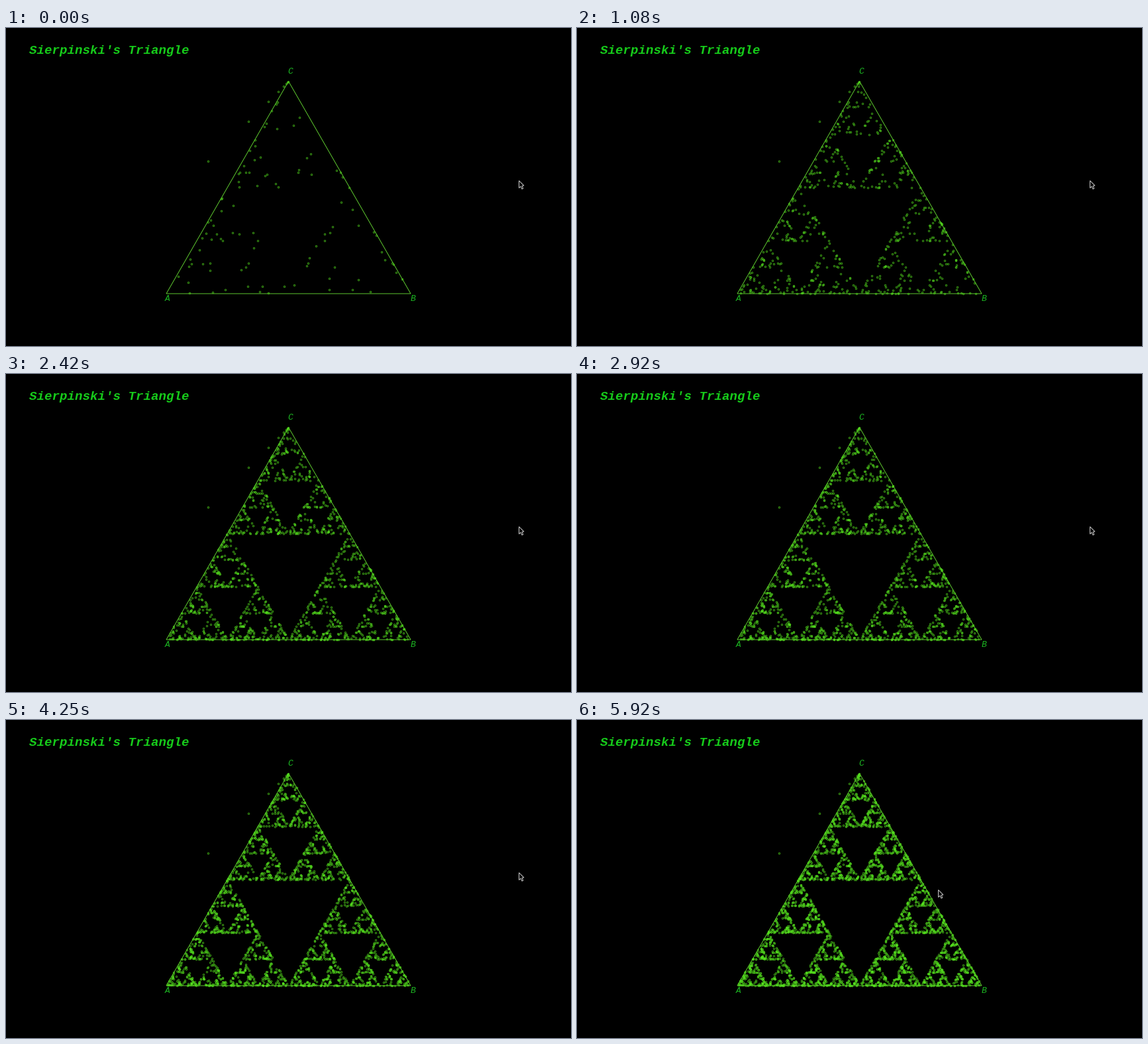
A matplotlib script for the animation above (6010 ms loop, 853 px wide and 480 px high).

```python
import random

import matplotlib.pyplot as plt
import numpy as np
from matplotlib.animation import FuncAnimation
from matplotlib.patches import Polygon

W, H, DPI = 853, 480, 80
FRAMES, LOOP_MS = 72, 6010
PT = 72 / DPI  # points per pixel

CORNERS = {"A": (242, 401), "B": (611, 401), "C": (426.5, 80.5)}
START = (305.5, 200.5)
APPROACH = 7  # first jumps, all toward C
FIRST_DOTS, DOTS_PER_FRAME = 106, 45

POINTER = np.array([(0, 0), (0, 11), (2.6, 8.6), (4.4, 12.6),
                    (6.2, 11.8), (4.5, 7.8), (7.4, 7.4)])


def chaos_game(count):
    """Repeatedly jump halfway to a random corner."""
    rng = random.Random(7)
    dots = np.empty((count, 2))
    dots[0] = START
    for i in range(1, count):
        pick = "C" if i <= APPROACH else rng.choice("ABC")
        dots[i] = (dots[i - 1] + CORNERS[pick]) / 2
    return dots


def pointer_at(frame):
    """Rest, drift right, then sweep left onto the triangle."""
    keys = (60, 62, 64, 67)
    x = np.interp(frame, keys, (774, 805, 607, 545))
    y = np.interp(frame, keys, (230, 242, 262, 256))
    return np.array([x, y]) + 0.5


def label(x, y, text, size, color, **style):
    ax.text(x, y, text, fontsize=size * PT, color=color, style="italic",
            family="Liberation Mono", va="baseline", **style)


fig = plt.figure(figsize=(W / DPI, H / DPI), dpi=DPI, facecolor="black")
ax = fig.add_axes([0, 0, 1, 1])
ax.set_xlim(0, W)
ax.set_ylim(H, 0)
ax.axis("off")

label(35.5, 39, "Sierpinski's Triangle", 19.1, "#16cb1a", weight="bold")
for name, x, y in (("A", 240, 412.5), ("B", 610.5, 412.5), ("C", 425.5, 69)):
    label(x, y, name, 13, "#1cb822")

ax.add_patch(Polygon(list(CORNERS.values()), fill=False, ec="#5cc42e",
                     lw=1.0 * PT, zorder=2))

dots = chaos_game(FIRST_DOTS + DOTS_PER_FRAME * (FRAMES - 1))
trail, = ax.plot([], [], "o", ms=2.5 * PT, mfc="none", mec="#56e41e",
                 mew=0.8 * PT, alpha=0.8, zorder=3)
pointer = ax.add_patch(Polygon(POINTER, fc="black", ec="#c8c8c8",
                               lw=1.0 * PT, zorder=5))


def draw(frame):
    shown = dots[:FIRST_DOTS + DOTS_PER_FRAME * frame]
    trail.set_data(shown[:, 0], shown[:, 1])
    pointer.set_xy(POINTER + pointer_at(frame))
    return trail, pointer


anim = FuncAnimation(fig, draw, frames=FRAMES, interval=LOOP_MS / FRAMES,
                     init_func=lambda: draw(0), repeat=True, repeat_delay=0)
plt.show()
```
